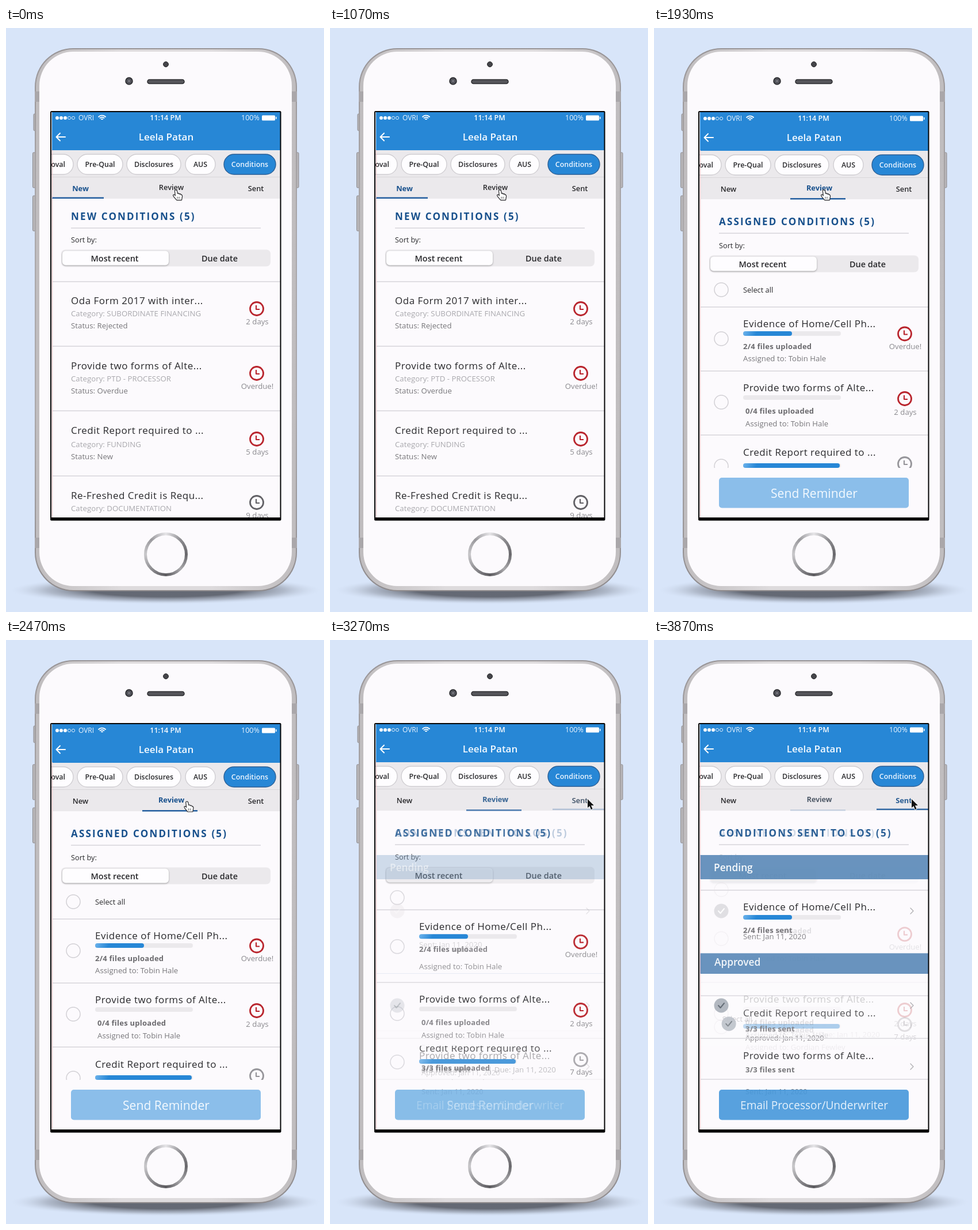
These frames come from a looping animation (553 px wide and 1013 px high, 3.94 s). An HTML page with a canvas:

```html
<!DOCTYPE html>
<html lang="en">
<head>
<meta charset="utf-8">
<title>Loan conditions app</title>
<style>
html, body { margin: 0; width: 100%; height: 100%; overflow: hidden; background: #d8e5f9; }
canvas { display: block; }
</style>
</head>
<body>
<canvas id="stage" width="553" height="1013"></canvas>
<script>
const ctx = document.getElementById('stage').getContext('2d');
const LOOP = 3940;
const BLUE = '#2787d6', NAVY = '#17508c', INK = '#29292c', GREY = '#77767a', PALE = '#a9a8ad';
const RED = '#b9252d', PAPER = '#fcfafd', BAND = '#ebe9ec', RULE = '#e0dee3', STEEL = '#5b8ab8';

const clamp = v => Math.max(0, Math.min(1, v));
const mix = (a, b, p) => a + (b - a) * p;
const easeOut = (t, start, duration) => 1 - (1 - clamp((t - start) / duration)) ** 1.5;
const smooth = u => u * u * (3 - 2 * u);
const fadeOut = p => (1 - p) ** 0.7;

function fade(alpha, draw) {
  if (alpha <= 0.002) return;
  ctx.save();
  ctx.globalAlpha *= Math.min(1, alpha);
  draw();
  ctx.restore();
}

function clipTo(x, y, w, h, draw) {
  ctx.save();
  ctx.beginPath();
  ctx.rect(x, y, w, h);
  ctx.clip();
  draw();
  ctx.restore();
}

// y is the middle of the capital letters
function text(str, x, y, size, color, { weight = 400, align = 'left', spacing = 0 } = {}) {
  ctx.font = `${weight} ${size}px "Open Sans", sans-serif`;
  ctx.letterSpacing = spacing + 'px';
  ctx.textAlign = align;
  ctx.fillStyle = color;
  ctx.fillText(str, x, y + size * 0.357);
}

function box(x, y, w, h, r, fill, stroke, width = 1) {
  ctx.beginPath();
  ctx.roundRect(x, y, w, h, r);
  if (fill) { ctx.fillStyle = fill; ctx.fill(); }
  if (stroke) { ctx.strokeStyle = stroke; ctx.lineWidth = width; ctx.stroke(); }
}

function path(points, color, width, cap = 'round') {
  ctx.beginPath();
  points.forEach(([x, y]) => ctx.lineTo(x, y));
  ctx.strokeStyle = color;
  ctx.lineWidth = width;
  ctx.lineCap = cap;
  ctx.lineJoin = 'round';
  ctx.stroke();
}

function circle(x, y, r, fill, stroke, width = 1.5) {
  box(x - r, y - r, 2 * r, 2 * r, r, fill, stroke, width);
}

function withStops(g, colors) {
  colors.forEach((c, i) => g.addColorStop(i / (colors.length - 1), c));
  return g;
}

const gradient = (x0, y0, x1, y1, ...colors) => withStops(ctx.createLinearGradient(x0, y0, x1, y1), colors);

const centered = (str, x, y, size, color, weight) => text(str, x, y, size, color, { weight, align: 'center' });
const title = (str, x, y) => text(str, x, y, 17, INK, { spacing: 0.5 });
const heading = (str, y) => text(str, 113, y, 17, NAVY, { weight: 700, spacing: 2.15 });
const detail = (str, x, y, color = GREY) => text(str, x, y, 13.2, color, { spacing: 0.05 });
const files = (str, x, y) => text(str, x, y, 13, '#6b6a6e', { weight: 700, spacing: 0.25 });
const rule = y => path([[80, y], [477, y]], RULE, 2, 'butt');
const radio = (x, y) => circle(x, y, 12, null, '#d2d0d5');
const chevron = y => path([[446, y - 5], [451, y], [446, y + 5]], '#a6a5a9', 1.3);

function clock(y, color) {
  circle(436, y, 11.5, null, color, 2.8);
  path([[435, y - 6], [435, y + 1], [441, y + 1]], color, 2.2, 'butt');
}

function due(label, y, color = '#8b8a8f') {
  centered(label, 437, y, 13.2, color);
}

function check(x, y, fill, mark) {
  circle(x, y, 12.5, fill);
  path([[x - 5, y], [x - 1.5, y + 4], [x + 5, y - 4]], mark, 2);
}

function progress(y, filled) {
  box(155, y - 4, 170, 8, 4, BAND);
  if (!filled) return;
  box(155, y - 4, filled, 8, 4, gradient(155, y - 4, 175, y + 6, '#6db3ec', BLUE));
}

function phone() {
  ctx.fillStyle = '#d8e5f9';
  ctx.fillRect(0, 0, 553, 1013);

  ctx.save();
  ctx.translate(278, 975);
  ctx.scale(1, 0.09);
  const shadow = ctx.createRadialGradient(0, 0, 130, 0, 0, 270);
  shadow.addColorStop(0, '#4a4d56d0');
  shadow.addColorStop(0.55, '#777c8868');
  shadow.addColorStop(1, '#c4cfe200');
  ctx.fillStyle = shadow;
  ctx.fillRect(-278, -280, 556, 560);
  ctx.restore();

  for (const [x, y, h] of [[48, 149, 29], [46.5, 216, 61], [46.5, 291, 61], [504, 216, 61]])
    box(x, y, 5, h, 1.5, '#b9b7ba', '#8c898c');

  box(50, 35, 456, 942, 67, gradient(0, 35, 0, 977, '#989496', '#aaa7a9', '#aaa7a9', '#8f8b8d'));
  box(52, 37, 452, 938, 65, gradient(52, 0, 504, 0, '#bfbcbe', '#dedbdd', '#dedbdd', '#bfbcbe'));
  ctx.fillStyle = '#aaa7aa';
  for (const x of [50, 497])
    for (const y of [110, 884]) ctx.fillRect(x, y, 9, 18);
  box(58, 41, 439, 927, 59, PAPER);

  circle(278, 63, 4.5, '#45454a', '#29292c', 1);
  circle(214, 92, 6, '#505158', '#27272b', 1.5);
  circle(214, 92, 2, '#77777f');
  box(246, 89.5, 64, 7, 3.5, '#56565b', '#2c2c30', 1.5);
  const metal = ['#68676b', '#a9a8ab', '#5b5a5e', '#8e8d91', '#c9c8cb', '#9a999d', '#e6e5e8', '#8d8c90', '#68676b'];
  circle(278, 913, 35.5, null, withStops(ctx.createConicGradient(0, 278, 913), metal), 5);
}

function header() {
  ctx.fillStyle = BLUE;
  ctx.fillRect(80, 140, 397, 72);
  for (let i = 0; i < 5; i++)
    circle(89 + i * 7, 156, i < 3 ? 3 : 2.6, i < 3 ? '#fff' : null, i < 3 ? null : '#fff', 0.8);
  text('OVRI', 126, 156, 12, '#eef6ff');
  for (const r of [3, 6.2, 9.4]) {
    ctx.beginPath();
    ctx.arc(167, 160, r - 1, -Math.PI * 0.78, -Math.PI * 0.22);
    ctx.strokeStyle = '#fff';
    ctx.lineWidth = 1.8;
    ctx.stroke();
  }
  centered('11:14 PM', 277.5, 156, 12.5, '#fff', 600);
  text('100%', 409, 156, 12.5, '#eef6ff');
  box(445, 151.5, 23, 9, 1.5, '#fff');
  ctx.fillRect(469, 154, 1.5, 4);
  path([[103, 189], [88, 189]], '#fff', 2);
  path([[94, 182.5], [87.5, 189], [94, 195.5]], '#fff', 2);
  centered('Leela Patan', 278.5, 189, 17, '#f4faff', 600);

  ctx.fillStyle = BAND;
  ctx.fillRect(80, 212, 397, 84);
  ctx.fillStyle = '#d9d7da';
  ctx.fillRect(80, 258, 397, 1);
  const pill = (label, x, w, active) => {
    box(x, 219, w, 35, 17.5, active ? BLUE : '#fefdff', active ? '#2a5f96' : '#d0ced2', 1.4);
    centered(label, x + w / 2, 236.5, 12.4, active ? '#eef6ff' : INK, 600);
  };
  pill('', 40, 77);
  text('oval', 103, 236.5, 12.4, INK, { weight: 600, align: 'right' });
  pill('Pre-Qual', 124, 79);
  pill('Disclosures', 210, 94);
  pill('AUS', 312, 52);
  pill('Conditions', 379, 90, true);
}

function tab(label, x, y, left, right, lineY, active) {
  fade(1 - active, () => centered(label, x, y, 12.8, INK, 600));
  fade(active, () => {
    centered(label, x, y, 12.8, NAVY, 700);
    ctx.fillStyle = '#245f9f';
    ctx.fillRect(left, lineY - 2, right - left, 2.5);
  });
}

function sorter(y) {
  text('Sort by:', 113, y - 32, 12.7, INK);
  box(96, y - 15, 364, 29, 7, BAND);
  ctx.save();
  ctx.shadowColor = '#0005';
  ctx.shadowBlur = 3;
  ctx.shadowOffsetY = 1;
  box(98, y - 13, 185, 25, 6, '#fefdff');
  ctx.restore();
  centered('Most recent', 189, y, 14.4, INK, 600);
  centered('Due date', 371.5, y, 14.4, INK, 600);
}

function newDetails(y, category, status) {
  detail('Category: ' + category, 113, y + 22.5, PALE);
  detail(status, 113, y + 43);
}

function newScreen(p) {
  fade(1 - p, () => {
    [440, 552, 664, 777].forEach(rule);
    title('Oda Form 2017 with inter...', 113, 473);
    newDetails(473, 'SUBORDINATE FINANCING', 'Status: Rejected');
    newDetails(586, 'PTD - PROCESSOR', 'Status: Overdue');
    newDetails(700, 'FUNDING', 'Status: New');
    title('Re-Freshed Credit is Requ...', 113, 811);
    newDetails(811, 'DOCUMENTATION', 'Requested: 2020 | Status: New');
    [['2 days', 487, RED], ['Overdue!', 599, RED], ['5 days', 713, RED], ['9 days', 823, '#626166']]
      .forEach(([label, y, color]) => { clock(y, color); due(label, y + 22); });
  });
}

// p: arrival of the review list, q: its change into the sent list
function lists(p, q) {
  const rowFade = p * (1 - q ** 2.5);
  const leave = p * fadeOut(q);
  const up = distance => -distance * q;

  clipTo(78, q > 0 ? 579 : 400, 400, 500, () => {
    fade(p * (1 - q * 0.85), () => text('Select all', mix(155, 115, q), 453 + 225 * q, 12.8, INK, { weight: 500 }));
    fade(q, () => check(mix(171, 126, q), mix(446, 688, q), '#b4bac2', '#687078'));
  });
  fade(leave, () => radio(117, 453 + up(22)));

  const y3 = up(97);
  fade(p, () => rule(705 + y3));
  fade(q > 0 ? 1 - q * (1 - q) : 1, () => title('Credit Report required to ...', mix(113, 155, p), mix(698, 735, p) + y3));
  fade(p * (1 - q * 0.65), () => progress(758 + y3, 168));
  fade(leave, () => {
    files('3/3 files uploaded', 159, 772 + up(105));
    radio(117, 759 + y3);
  });
  fade(leave * 0.55, () => {
    detail('| Due: Jan 11, 2020', 275, 772 + y3);
    detail('Assigned to: Gordian Fewley', 159, 794 + y3);
  });
  fade(p * (1 - q * 0.75), () => {
    clock(755 + y3, '#96959a');
    due('7 days', 776 + y3, '#6f6e73');
  });
  fade(q, () => {
    files('3/3 files sent', 159, 772 + up(107));
    text('Approved: Jan 11, 2020', 159, 778 + y3, 12.8, GREY, { weight: 500 });
  });

  if (q > 0) fade(clamp(1.3 * (1 - q)), () => {
    ctx.fillStyle = PAPER;
    ctx.fillRect(80, 595, 397, 109);
  });

  fade(leave, () => rule(594));
  fade(1 - q ** 2.5, () => title('Provide two forms of Alte...', mix(113, 155, p), mix(586, 623, p)));
  fade(rowFade, () => {
    progress(640, 0);
    clock(642, RED);
    due('2 days', 665);
  });
  fade(leave, () => {
    files('0/4 files uploaded', 159, 663);
    detail('Assigned to: Tobin Hale', 159, 685);
    radio(117, 648);
  });

  fade(p, () => {
    rule(483 + up(54));
    title('Evidence of Home/Cell Ph...', 155, 512 + up(54));
    progress(529 + up(53), 85);
  });
  fade(leave, () => {
    files('2/4 files uploaded', 155, 551 + up(51));
    detail('Assigned to: Tobin Hale', 155, 572 + up(22));
    radio(117, 538 + up(22));
  });
  fade(rowFade, () => {
    clock(529.5 + up(21), RED);
    due('Overdue!', 551.5 + up(21));
  });

  fade(q, () => {
    files('2/4 files sent', 155, 551 + up(53));
    detail('Sent: Jan 11, 2020', 155, 534 + up(22));
    check(117, 470, '#dddce0', '#fff');
    check(117, 634, '#aab1ba', '#5f6770');
    [470, 634, 740].forEach(chevron);
    [691, 762].forEach(rule);
    ctx.fillStyle = STEEL;
    ctx.fillRect(80, 373, 397, 42);
    const top = 594 + up(56);
    clipTo(80, top, 397, Math.max(0, 579 - top), () => {
      ctx.fillStyle = STEEL;
      ctx.fillRect(80, top, 397, 60);
      text('Approved', 105, 559, 17.3, '#fff', { weight: 600 });
    });
  });
  fade(Math.sqrt(q), () => text('Pending', 104, 395, 17.3, '#fff', { weight: 600 }));
  fade(q ** 0.75, () => {
    title('Provide two forms of Alte...', 155, 721);
    files('3/3 files sent', 159, 745);
  });
}

function footer(p, q) {
  fade(p, () => {
    ctx.fillStyle = PAPER;
    ctx.fillRect(80, 763, 397, 90);
  });
  fade(Math.sqrt(q), () => text('Sent: Jan 11, 2020', 159, 783, 12.8, GREY, { weight: 600 }));
  const button = (label, size, color) => {
    box(113, 780, 330, 52.5, 5, color);
    centered(label, 278.5, 807, size, '#f4faff');
  };
  fade(p * fadeOut(q), () => button('Send Reminder', 21.1, '#8bbeea'));
  fade(q, () => button('Email Processor/Underwriter', 19.1, '#4a9adc'));
}

function screen(t) {
  const p = easeOut(t, 1075, 800);
  const q = easeOut(t, 3075, 1000);
  const restShift = p === 1 && q === 0 ? 1 : 0;

  clipTo(78, 145, 400, 705, () => {
    ctx.fillStyle = PAPER;
    ctx.fillRect(78, 145, 400, 710);
    ctx.save();
    ctx.translate(0, restShift);
    fade(1 - p, () => heading('NEW CONDITIONS (5)', mix(327, 335, p)));
    fade(q, () => heading('CONDITIONS SENT TO LOS (5)', 334.5));
    fade(p * fadeOut(q), () => heading('ASSIGNED CONDITIONS (5)', mix(327, 335, p)));
    const lineY = mix(347, 355, p);
    path([[113, lineY], [443, lineY]], RULE, 2, 'butt');
    fade(fadeOut(q), () => sorter(mix(399.5, 408.5, p)));
    newScreen(p);
    lists(p, q);
    header();
    tab('New', 129.5, 278.5, 80, 170, 295.5, 1 - p);
    tab('Review', 287.5, 276.5, 237, 333, 296, p * fadeOut(q));
    tab('Sent', 434.5, 278.5, 387, 477, 294.5, q);
    ctx.restore();
    footer(p, q);
  });

  ctx.fillStyle = '#000';
  ctx.fillRect(78, 849, 400, 5);
  ctx.setLineDash([1, 1]);
  path([[80.5, 212], [80.5, 849]], '#e0878c', 1, 'butt');
  ctx.setLineDash([]);
  box(78, 145, 399.5, 708.5, 1, null, '#050506', 2);
}

function cursor(t) {
  const move = smooth(clamp((t - 2350) / 550));
  const x = mix(292, 448, move), y = mix(281, 276, move);
  const hand = x < 312;
  const outline = new Path2D(hand
    ? 'M2 1Q4-1 5 2L6 7Q8 5 9 8Q11 6 12 9Q14 8 14 11L13 17H5L0 11Q-2 8 1 9L3 11Z'
    : 'M0 0V15L3.5 12L6 18L8.6 17L6 11H11Z');
  ctx.save();
  ctx.translate(x, y);
  ctx.lineJoin = 'round';
  ctx.lineWidth = hand ? 2.4 : 1.6;
  ctx.strokeStyle = hand ? '#29292c' : '#fff';
  ctx.fillStyle = hand ? '#fff' : '#111';
  ctx.stroke(outline);
  ctx.fill(outline);
  if (hand) {
    path([[6, 12], [6, 15]], '#29292c', 0.8);
    path([[9, 12], [9, 15]], '#29292c', 0.8);
  }
  ctx.restore();
}

function frame() {
  const t = performance.now() % LOOP;
  phone();
  screen(t);
  cursor(t);
  requestAnimationFrame(frame);
}
frame();
</script>
</body>
</html>
```
